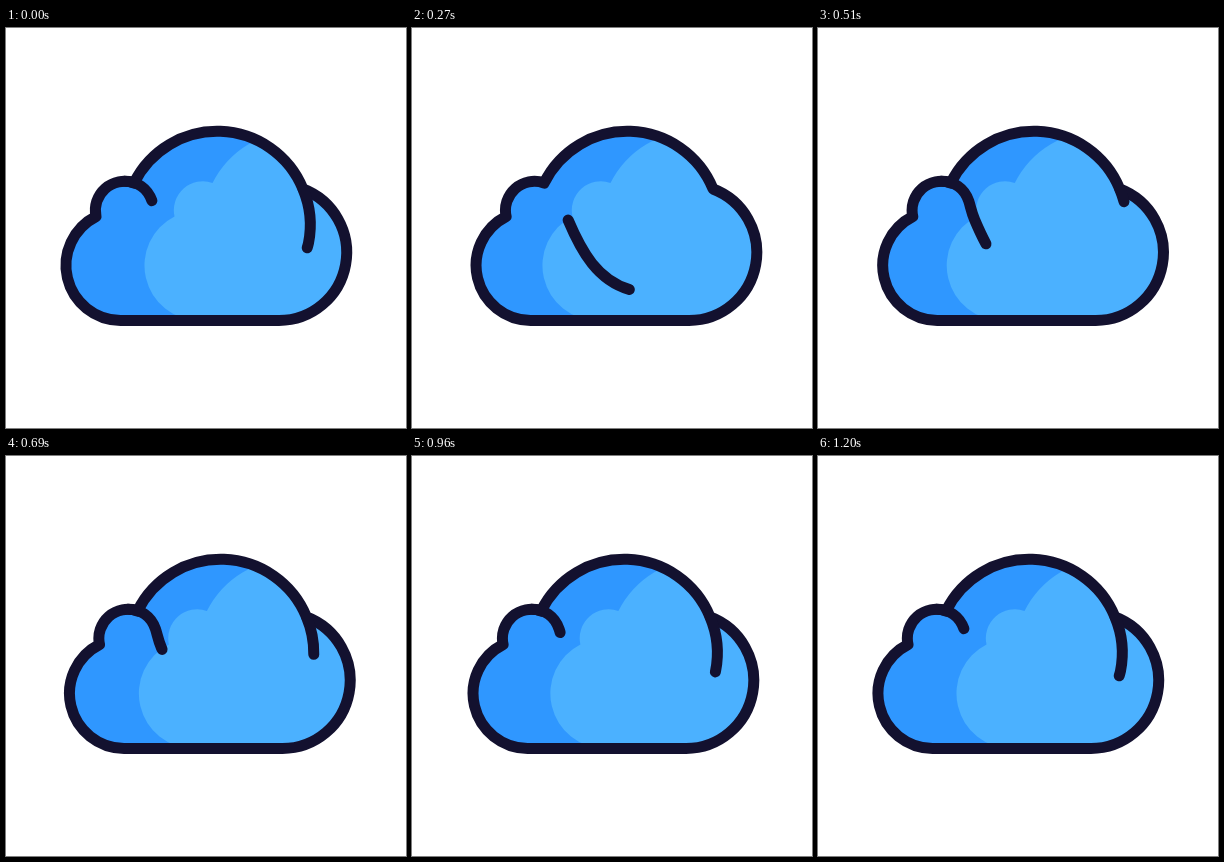
Animation, 400 px wide and 400 px high, one loop 1.29 s. Source, as an HTML page:

```html
<!DOCTYPE html>
<html lang="en">
<head>
<meta charset="utf-8">
<title>Cloud</title>
<style>
  html, body { margin: 0; width: 100%; height: 100%; overflow: hidden; background: #fff; }
  svg { display: block; width: 100%; height: 100%; }
  .line { fill: none; stroke: #13112f; stroke-width: 11; stroke-linecap: round; stroke-linejoin: round; }
</style>
</head>
<body>
<svg viewBox="0 0 400 400">
  <defs>
    <path id="shape" d="M114.5 292.5A55 55 0 0 1 90 188.5A29 29 0 0 1 128 155A92.7 92.7 0 0 1 297 161A68 68 0 0 1 273 292.5Z"/>
    <clipPath id="inside"><use href="#shape"/></clipPath>
  </defs>
  <g id="cloud">
    <use href="#shape" fill="#2f97ff"/>
    <g clip-path="url(#inside)"><use id="light" href="#shape" fill="#4bb1ff"/></g>
    <use href="#shape" class="line"/>
    <path id="swirl" class="line" d="M297 161A92.7 92.7 0 0 1 302.5 215C297 240 268 267 230.5 264Q222 263.6 215 262C182 253 166 225 152 192C148.5 184 148 179 146 173C141.5 160 131 153.3 118.3 153.3"/>
  </g>
</svg>
<script>
const LOOP = 1290, END = 1200, STEP = 30, PEAK = 400;
const DASH = 96, GAP = 223;
const cloud = document.getElementById('cloud');
const light = document.getElementById('light');
const swirl = document.getElementById('swirl');
swirl.setAttribute('stroke-dasharray', `${DASH} ${GAP}`);

const clamp = v => Math.min(1, Math.max(0, v));
const smooth = u => u * u * (3 - 2 * u);

// Cubic Bezier easing, solved by bisection
function bezier(x1, y1, x2, y2) {
  const at = (p, a, b) => 3 * (1 - p) ** 2 * p * a + 3 * (1 - p) * p * p * b + p ** 3;
  return x => {
    if (x <= 0 || x >= 1) return clamp(x);
    let lo = 0, hi = 1;
    for (let i = 0; i < 30; i++) {
      const mid = (lo + hi) / 2;
      if (at(mid, x1, x2) < x) lo = mid; else hi = mid;
    }
    return at(lo, y1, y2);
  };
}
const rush = bezier(.167, .167, 0, 1);
const sway = bezier(.167, .167, .667, 1);

// Rise to 1 at PEAK, then fall back to 0 at the given time
const pulse = (t, back, rise) => t < PEAK
  ? rise(t / PEAK)
  : 1 - smooth(clamp((t - PEAK) / (back - PEAK)));

function draw(ms) {
  const t = Math.min(END, Math.floor((ms % LOOP) / STEP) * STEP);
  const drift = 5 * pulse(t, END, sway);
  const shade = 78.5 - 10.7 * pulse(t, 1000, smooth);
  const tail = (DASH + GAP) * rush(t / END) - 36;
  cloud.setAttribute('transform', `translate(${drift} 0)`);
  light.setAttribute('transform', `translate(${shade - drift} 0)`);
  swirl.setAttribute('stroke-dashoffset', -tail);
}

const start = performance.now();
function tick() {
  draw(performance.now() - start);
  requestAnimationFrame(tick);
}
draw(0);
requestAnimationFrame(tick);
</script>
</body>
</html>
```
